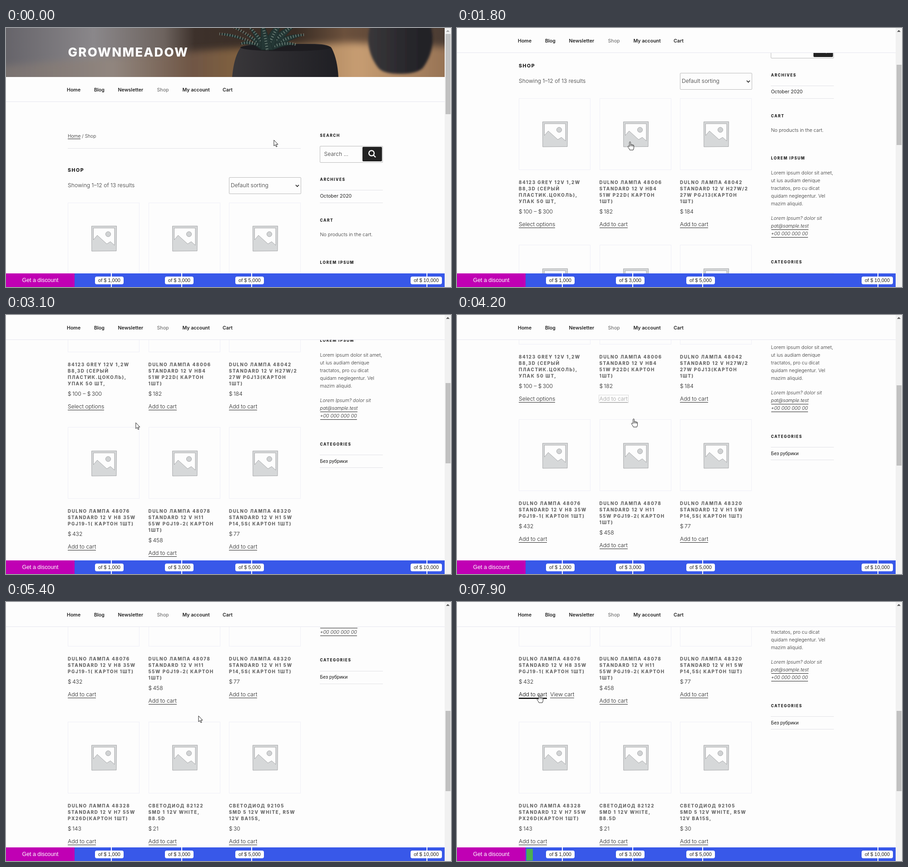
An HTML page that plays this animation: 980x571 px, repeating every 8000 ms.

```html
<!DOCTYPE html>
<html lang="en">
<head>
<meta charset="utf-8">
<title>Shop</title>
<style>
html, body { margin: 0; width: 100%; height: 100%; overflow: hidden; }
#stage { position: relative; width: 980px; height: 571px; overflow: hidden; background: #fdfdfd; font: 350 12.2px/14px Inter, sans-serif; color: #333; }
#stage div, #stage p, #stage svg { position: absolute; margin: 0; box-sizing: border-box; }
#stage p { white-space: pre; margin-top: -7px; }
a { display: inline-block; color: #222; box-shadow: 0 1px #222; }
.brand { font-size: 27.4px; font-weight: 800; letter-spacing: .08em; color: #fff; }
.menu { font-size: 10.6px; font-weight: 600; color: #222; }
.dim { color: #777; font-weight: 500; }
.crumb { font-size: 10.2px; }
.crumb a { line-height: 12px; }
.h1 { font-size: 10.7px; font-weight: 800; letter-spacing: .14em; color: #222; }
.h2 { font-size: 8.4px; font-weight: 800; letter-spacing: .1818em; color: #222; }
.name { font-size: 9.9px; font-weight: 800; letter-spacing: .1538em; color: #666; }
.dark { color: #222; }
.small { font-size: 10.6px; font-weight: 400; }
#stage .para { font-size: 10.6px; line-height: 17px; margin-top: -8.5px; }
.para a { line-height: 14px; }
.cyr { font: 400 10.6px/14px Roboto, sans-serif; color: #222; }
.rule { height: 1px; background: #e2e2e6; }
.box { border: 1px solid #bbb; border-radius: 2px; }
.frame { width: 158px; height: 158px; border: 1px solid #efeff7; }
.view { margin-left: 7px; display: none; }
.busy { opacity: .42; }
.focus { outline: 1px solid #aaa; outline-offset: 1px; }
.hover { color: #000; box-shadow: 0 2.5px #000; }
.bar { font: 11px/17px "Liberation Sans", Arial, sans-serif; color: #222; }
.tag { top: 548px; height: 17px; background: #fff; border-radius: 4px; text-align: center; }
</style>
</head>
<body>
<div id="stage">
  <div id="page"></div>
  <div id="nav" style="width:967px;height:55px;background:#fdfdfd;border-bottom:1px solid #e6e6ef"></div>
  <div id="bar" class="bar" style="top:541px;width:967px;height:30px;background:#3858e9"></div>
  <div id="tags" class="bar"></div>
  <div style="left:966px;width:14px;height:571px;background:#f1f1f1"></div>
  <div id="thumb" style="left:967.5px;width:11px;height:177px;background:#c1c1c1"></div>
  <svg style="left:969px;top:4px" width="8" height="5"><path id="up" d="M0 4.5 4 .5 8 4.5z"/></svg>
  <svg id="cursor" width="20" height="24" style="overflow:visible" stroke-linejoin="round">
    <path id="arrow" d="M0 0V13L3 10.3 5 15 7 14.2 5 9.6H9z" fill="#fff" stroke="#222"/>
    <path id="hand" d="M-1.3 10V1.2Q-1.3 0 0 0T1.3 1.2V6Q2.7 5 3.9 6.4 5.3 5.5 6.3 7 8.5 6.4 8.5 9V12.5Q8.5 15 7 18H-.6Q-1.3 15.5-4 12.2-5.3 10.4-4.2 9.4-2.8 8.6-1.3 11M1.3 6V10M3.9 6.4V10M6.3 7V10.5" fill="#fff" stroke="#222"/>
  </svg>
</div>
<script>
const $ = id => document.getElementById(id);
const text = (x, y, s, cls = '') => `<p class="${cls}" style="left:${x}px;top:${y}px">${s}</p>`;
const rule = (x, y, w) => `<div class="rule" style="left:${x}px;top:${y}px;width:${w}px"></div>`;
const box = (x, y, w, h, cls, css = '') =>
  `<div class="${cls}" style="left:${x}px;top:${y}px;width:${w}px;height:${h}px;${css}"></div>`;

// Header picture
const leaf = ([x, y]) => {
  const cx = 575 + (x - 575) * .55, cy = y * .5 + 8;
  return `<path d="M562 48Q${cx - 7} ${cy - 6} ${x} ${y}Q${cx + 7} ${cy + 9} 588 48z" fill="#243735" stroke="#1c2a29"/>
    <path d="M575 47Q${cx} ${cy + 1} ${x} ${y}" fill="none" stroke="#9fb0a4" stroke-opacity=".75" stroke-width="6" stroke-dasharray="1.3 4.5"/>`;
};
const header = `<svg width="967" height="108">
  <defs>
    <linearGradient id="wall"><stop offset="0" stop-color="#66646a"/><stop offset=".2" stop-color="#8a878a"/>
      <stop offset=".36" stop-color="#6d635e"/><stop offset=".43" stop-color="#3d312b"/><stop offset=".66" stop-color="#382c24"/>
      <stop offset=".77" stop-color="#6b503c"/><stop offset="1" stop-color="#4b3c33"/></linearGradient>
    <linearGradient id="table"><stop offset="0" stop-color="#77706f"/><stop offset=".25" stop-color="#91867f"/>
      <stop offset=".42" stop-color="#6f5645"/><stop offset=".52" stop-color="#80603f"/>
      <stop offset=".78" stop-color="#c79d72"/><stop offset="1" stop-color="#8f6c50"/></linearGradient>
    <linearGradient id="pot"><stop offset="0" stop-color="#39373a"/><stop offset=".5" stop-color="#2b2a2e"/>
      <stop offset="1" stop-color="#1f1f24"/></linearGradient>
    <filter id="soft" x="-20%" y="-50%" width="140%" height="200%"><feGaussianBlur stdDeviation="8"/></filter>
    <filter id="blur"><feGaussianBlur stdDeviation="2.5"/></filter>
  </defs>
  <path d="M0 0H967V108H0z" fill="url(#wall)"/>
  <path d="M-20 85 200 66 480 46 760 32 1000 42V130H-20z" fill="url(#table)" filter="url(#soft)"/>
  <path d="M803-10H934Q950 45 918 88 905 101 868 101T820 88Q787 45 803-10z" fill="url(#pot)" filter="url(#blur)"/>
  <path d="M498 108Q502 65 515 46 520 36 560 35H680Q714 36 718 46 730 70 732 108z" fill="url(#pot)"/>
  <ellipse cx="616" cy="43" rx="100" ry="8" fill="#1d1c20"/>
  ${[[470, 13], [656, 15], [486, -8], [640, -8], [516, 35], [640, 37], [520, -16], [608, -16], [562, -20]].map(leaf).join('')}
</svg>`;

// Products
const std = 'STANDARD 12 V ', lamp = 'DULNO ЛАМПА ';
const products = [
  ['84123 GREY 12V 1,2W\nB8,3D (СЕРЫЙ\nПЛАСТИК.ЦОКОЛЬ),\nУПАК 50 ШТ,', '100 – $\u2009300'],
  [lamp + '48006\n' + std + 'HB4\n51W P22D( КАРТОН\n1ШТ)', 182],
  [lamp + '48042\n' + std + 'H27W/2\n27W PGJ13(КАРТОН\n1ШТ)', 184],
  [lamp + '48076\n' + std + 'H8 35W\nPGJ19-1( КАРТОН 1ШТ)', 432],
  [lamp + '48078\n' + std + 'H11\n55W PGJ19-2( КАРТОН\n1ШТ)', 458],
  [lamp + '48320\n' + std + 'H1 5W\nP14,5S( КАРТОН 1ШТ)', 77],
  [lamp + '48328\n' + std + 'H7 55W\nPX26D(КАРТОН 1ШТ)', 143],
  ['СВЕТОДИОД 82122\nSMD 1 12V WHITE,\nB8.5D', 21],
  ['СВЕТОДИОД 92105\nSMD 5 12V WHITE, R5W\n12V BA15S,', 30]
];
const picture = (x, y) => `<svg style="left:${x}px;top:${y}px" width="57" height="57" stroke="#97999b" stroke-width=".8">
  <path d="M.5.8 55.5.5 55 55.5.8 56z" fill="#d6d8d9"/>
  <path d="M4.5 5H51V43L42 35 34 40 13 21 4.5 31z" fill="#fdfdfd"/>
  <circle cx="37" cy="18.5" r="5.6" fill="#d0d2d3"/></svg>`;
const product = ([name, price], i) => {
  const x = 136 + i % 3 * 177.5, y = 384.5 + Math.floor(i / 3) * 323.5;
  const priceY = y + 185 + 14 * (name.split('\n').length - 1) + 23;
  return box(x, y, 158, 158, 'frame') + picture(x + 52, y + 51.5) +
    text(x, y + 185, name, 'name') + text(x, priceY, '$\u2009' + price, 'dark') +
    text(x, priceY + 28, `<a id="add${i}">${i ? 'Add to cart' : 'Select options'}</a><a class="view" id="view${i}">View cart</a>`);
};

const main = text(136, 238, '<a>Home</a> / Shop', 'crumb') + rule(136, 265, 513) +
  text(136, 313.5, 'SHOP', 'h1') + text(136, 347, 'Showing 1–12 of 13 results') +
  box(491, 329, 159, 37, 'box') + text(495, 347, 'Default sorting') +
  '<svg style="left:637px;top:345px" width="9" height="6"><path d="M1 1 4.5 4.5 8 1" fill="none" stroke="#222" stroke-width="1.7"/></svg>' +
  products.map(product).join('');

const side = text(691.5, 236.5, 'SEARCH', 'h2') + box(691, 259.5, 139, 37, 'box') +
  text(700.5, 278, 'Search ...') + box(785, 262, 43, 32, '', 'background:#222;border-radius:2px') +
  '<svg style="left:797px;top:268px" width="20" height="20" fill="none" stroke="#fff" stroke-width="2.4"><circle cx="8" cy="8" r="5.8"/><path d="M12 12 17 17"/></svg>' +
  text(691.5, 334, 'ARCHIVES', 'h2') + rule(691, 357, 139) + text(691.5, 371, 'October 2020', 'small dark') + rule(691, 385, 139) +
  text(691.5, 423.5, 'CART', 'h2') + '<div id="cart"></div>' +
  '<div id="lower">' + text(691.5, 517, 'LOREM IPSUM', 'h2') +
  text(691.5, 549, 'Lorem ipsum dolor sit amet,\nut ius audiam denique\ntractatos, pro cu dicat\nquidam neglegentur. Vel\nmazim aliquid.', 'para') +
  text(691.5, 649.5, '<i>Lorem Ipsum? dolor sit\n<a>pat@sample.test</a>\n<a>+00 000 000 00</a></i>', 'para') +
  text(691.5, 745.5, 'CATEGORIES', 'h2') + rule(691, 769, 139) + text(691.5, 783.5, 'Без рубрики', 'cyr') + rule(691, 797, 139) + '</div>';

$('page').innerHTML = header + text(136.5, 53, 'GROWNMEADOW', 'brand') + main + side;
$('nav').innerHTML = [[134, 'Home'], [194, 'Blog'], [246.5, 'Newsletter'], [332.5, 'Shop'], [388.5, 'My account'], [477, 'Cart']]
  .map(([x, s]) => text(x, 28.5, s, s === 'Shop' ? 'menu dim' : 'menu')).join('');
$('bar').innerHTML = '<div style="width:151px;height:30px;background:#c000b4;color:#fff;font-size:12.4px;line-height:30px;text-align:center">Get a discount</div>' +
  '<div id="fill" style="left:153px;top:3px;height:26px;background:#4caf50"></div>';
$('tags').innerHTML = [[231, 196, 63, '1,000'], [386, 350, 63, '3,000'], [540, 505, 63, '5,000'], [926, 891, 69, '10,000']]
  .map(([line, x, w, s]) => box(line, 541, 2, 30, '', 'background:#fff') +
    `<div class="tag" style="left:${x}px;width:${w}px">of $ ${s}</div>`).join('');

const emptyCart = text(691.5, 455, 'No products in the cart.', 'para');
const fullCart = text(691.5, 455, 'Dulno Лампа 48006\nStandard 12 V HB4 51W\nP22D( картон 1шт)\n1 × $ 182\n\nSubtotal: $ 182\n\n<a>View cart</a>\n<a>Checkout</a>', 'para');

// Motion
const clamp = v => Math.max(0, Math.min(1, v));
const ease = v => (v = clamp(v), v * v * (3 - 2 * v));
const notches = [650, 979, 1400, 1950, 2050, 2255, 4138, 4680, 4860, 5040];
const scrollAt = t => Math.round(76.75 * notches.reduce((sum, start) => sum + ease((t - start) / 200), 0));
const path = [[0, 590, 247], [400, 590, 247], [900, 379, 250], [1800, 381, 251], [2200, 270, 247], [2900, 270, 247],
  [3600, 350, 199], [3950, 350, 199], [4200, 389, 229], [4500, 424, 251], [5700, 424, 251], [6400, 616, 230],
  [6600, 616, 230], [7150, 181, 204], [8000, 181, 204]];
const pointer = t => {
  const i = path.findIndex(k => k[0] > t), [t0, x0, y0] = path[i - 1], [t1, x1, y1] = path[i];
  const k = ease((t - t0) / (t1 - t0));
  return [x0 + (x1 - x0) * k, y0 + (y1 - y0) * k];
};
const within = (t, a, b) => t >= a && t < b;
const show = (id, on, mode = 'inline-block') => $(id).style.display = on ? mode : 'none';
let cartState;

function draw(t) {
  const scroll = scrollAt(t), added = t >= 4580, second = t >= 7600;
  $('page').style.transform = `translateY(${-scroll}px)`;
  $('nav').style.top = Math.max(0, 108 - scroll) + 'px';
  $('thumb').style.top = 13 + scroll * .2962 + 'px';
  $('up').setAttribute('fill', scroll ? '#505050' : '#a3a3a3');

  if (cartState !== added) $('cart').innerHTML = (cartState = added) ? fullCart : emptyCart;
  $('lower').style.top = (added ? 150.5 : 0) + (second ? 100.5 : 0) + 'px';
  $('fill').style.width = 14 * ease((t - 5800) / 300) + 'px';

  const first = $('add1').classList, next = $('add3').classList;
  first.toggle('hover', within(t, 3550, 3900));
  first.toggle('busy', within(t, 3900, 4580));
  first.toggle('focus', within(t, 3900, 7250));
  next.toggle('hover', t >= 7130);
  next.toggle('busy', within(t, 7300, 7600));
  show('view1', added);
  show('view3', second);

  const [x, y] = pointer(t);
  const hand = within(t, 850, 2050) || within(t, 3500, 4330) || t >= 7100;
  $('cursor').style.transform = `translate(${x}px,${y}px)`;
  show('hand', hand, 'inline');
  show('arrow', !hand, 'inline');
}

const step = 100, begin = performance.now();
(function tick() {
  const t = performance.now() - begin + 10;
  draw(Math.floor(t / step) * step % 8000);
  requestAnimationFrame(tick);
})();
</script>
</body>
</html>
```
